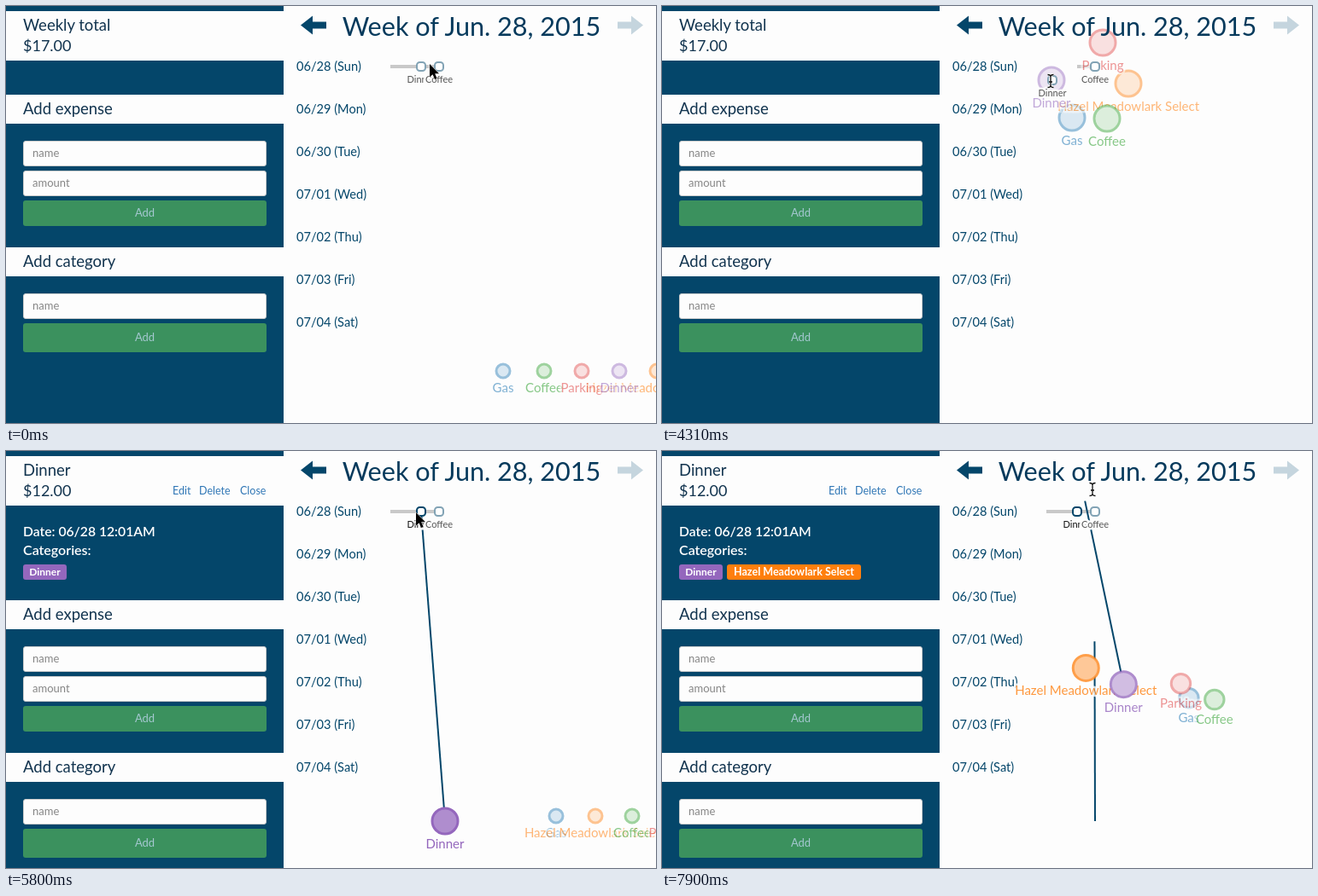
Animation of 761 by 489 pixels, one loop 8000 ms. Source, as an HTML page:

```html
<!DOCTYPE html>
<html lang="en">
<head>
<meta charset="utf-8">
<title>Weekly expenses</title>
<style>
  html, body { margin: 0; width: 100%; height: 100%; overflow: hidden; background: #fdfdfd; }
  svg { display: block; font-family: Lato, "Open Sans", sans-serif; }
  .halo { paint-order: stroke; stroke: #fdfdfd; stroke-width: 5px; stroke-linejoin: round; }
</style>
</head>
<body>
<svg id="stage" width="761" height="489" viewBox="0 0 761 489"></svg>
<script>
const LOOP = 8000, NAVY = '#04466a', PAPER = '#fdfdfd', INK = '#12344f';
const CARD = 'Hazel Meadowlark Select';
const DROPS = [4396, 7697], MOVE = 395;
const HOME = [486, 71], GRAB = [484, 72];

// The picture only changes at these moments.
const STEPS = [0, 150, 300, 440, 590, 890, 1040, 1190, 1330, 1630, 2670,
  3860, 4010, 4160, 4310, 4450, 4600, 4750, 4900, 5050, 5200, 5350, 5500,
  5800, 5950, 6250, 7000, 7150, 7300, 7450, 7600, 7750, 7900];

// time, x, y of the pointer
const POINTER = [[0, 496, 68], [590, 482, 73], [740, 482, 73], [1040, 498, 71],
  [1330, 486, 72], [1630, 484, 72], [3710, 484, 72], [4310, 455, 88], [4900, 455, 88],
  [5200, 470, 95], [5500, 484, 73], [5800, 480, 72], [5950, 483, 72], [6850, 483, 72],
  [7600, 504, 45], [LOOP, 504, 45]];

// docks: x in each of the three rows; rings: place around the picked expense
const CATEGORIES = [
  { name: 'Gas', color: '#1f77b4', docks: [582, 644, 689], rings: [[480, 131], [532, 127]] },
  { name: CARD, color: '#ff7f0e', docks: [762, 690, 488], rings: [[546, 91], [506, 43]], since: 2 },
  { name: 'Coffee', color: '#2ca02c', docks: [630, 733, 786], rings: [[521, 132], [483, 131]] },
  { name: 'Parking', color: '#e14444', docks: [674, 777, 737], rings: [[516, 43], [455, 90]] },
  { name: 'Dinner', color: '#9467bd', docks: [718, 514, 533], rings: [[456, 87], [549, 85]], since: 1 },
];

const mix = (a, b, p) => a.map((v, i) => v + (b[i] - v) * p);
const easeInOut = u => u < .5 ? 4 * u ** 3 : 1 - 4 * (1 - u) ** 3;
const progress = (t, start) => easeInOut(Math.min(1, Math.max(0, (t - start) / MOVE)));

function pointerAt(t) {
  const i = POINTER.findIndex(k => k[0] > t);
  const [a, b] = [POINTER[i - 1], POINTER[i]];
  return mix(a, b, (t - a[0]) / (b[0] - a[0])).slice(1);
}

const text = (x, y, size, fill, s, more = '') =>
  `<text x="${x}" y="${y}" font-size="${size}" fill="${fill}" ${more}>${s}</text>`;
const rect = (x, y, w, h, fill, more = '') =>
  `<rect x="${x}" y="${y}" width="${w}" height="${h}" fill="${fill}" ${more}/>`;
const line = ([x1, y1], [x2, y2], color, width = 2) =>
  `<line x1="${x1}" y1="${y1}" x2="${x2}" y2="${y2}" stroke="${color}" stroke-width="${width}"/>`;
const MID = 'text-anchor="middle"', BOLD = 'font-weight="600"';

const field = (y, hint) => rect(20.5, y + .5, 284, 29, PAPER, 'rx="2.5" stroke="#ccc"')
  + text(31, y + 19, 13, '#858585', hint);
const button = (y, h) => rect(20, y, 285, h, '#3b915e', 'rx="3"')
  + text(162.5, y + h / 2 + 4, 13, '#a6c9d2', 'Add', MID);
const band = (y, s) => rect(0, y, 325, 34, PAPER) + text(20, y + 23, 18.5, INK, s);
const tag = (x, w, color, s, size) => rect(x, 133, w, 18, color, 'rx="3"')
  + text(x + w / 2, 146, size, '#fff', s, MID + ' font-weight="700"');

function panel(t) {
  const open = t >= DROPS[0], dy = open ? 71 : 0;
  let s = rect(0, 0, 325, 489, NAVY) + rect(0, 6, 325, 58, PAPER)
    + text(20, 29, 18.5, INK, open ? 'Dinner' : 'Weekly total')
    + text(20, 53, 18, INK, open ? '$12.00' : '$17.00');
  if (open) {
    s += text(195, 51, 12.5, '#2f76b5', 'Edit') + text(226, 51, 12.5, '#2f76b5', 'Delete')
      + text(274, 51, 12.5, '#2f76b5', 'Close')
      + text(20, 100, 15.7, '#fff', 'Date: 06/28 12:01AM', BOLD)
      + text(20, 122, 16, '#fff', 'Categories:', BOLD)
      + tag(20, 51, '#9467bd', 'Dinner', 12);
    if (t >= DROPS[1]) s += tag(76, 157, '#ff7f0e', CARD, 12.5);
  }
  return s + `<g transform="translate(0 ${dy})">` + band(104, 'Add expense')
    + field(158, 'name') + field(193, 'amount') + button(228, 30)
    + band(283, 'Add category') + field(337, 'name') + button(372, 34) + '</g>';
}

// x, y, radius, opacity, fill opacity
function categoryAt(c, t) {
  const dock = row => c.since <= row
    ? [c.docks[row], 434, 15, 1, .75] : [c.docks[row], 428, 8, .45, .35];
  if (t < 2670) return dock(0);
  const n = t < 6250 ? 0 : 1;
  return mix([...c.rings[n], 15, .45, .35], dock(n + 1), progress(t, DROPS[n]));
}

function category(c, t) {
  const [x, y, r, alpha, fill] = categoryAt(c, t);
  return `<circle cx="${x}" cy="${y}" r="${r}" fill="${PAPER}"/>
    <circle cx="${x}" cy="${y}" r="${r}" fill="${c.color}" fill-opacity="${fill}"
      stroke="${c.color}" stroke-width="3" opacity="${alpha}"/>`
    + text(x, y + r + 17, 15, c.color, c.name, `${MID} class="halo" opacity="${.2 + .8 * alpha}"`);
}

function expense([x, y], name, active) {
  return rect(x - 5, y - 5, 10, 10, '#fff', `rx="3.5" stroke="${active ? NAVY : '#82a3b5'}" stroke-width="2"`)
    + text(x, y + 19, 11, active ? '#111' : '#555', name, MID + ' class="halo"');
}

function chart(t) {
  const n = t < 6250 ? 0 : 1, p = progress(t, DROPS[n]);
  const picked = t >= 2670 && t < 4900 || t >= 6250;
  const dragged = n ? t >= 7000 : picked;
  const hand = pointerAt(Math.min(t, n ? 7600 : 4310));
  const held = dragged ? HOME.map((v, i) => v + hand[i] - GRAB[i]) : HOME;
  const node = p > .5 ? HOME : held;
  const dinner = categoryAt(CATEGORIES[4], t);
  let s = '';

  if (!picked || p > .5) s += line([450, 71], [507, 71], '#c9c9c9', 4);
  else if (!n) s += line([486, 71], [507, 71], '#c9c9c9', 4);

  // A new link grows up from the row towards the dropped expense.
  if (picked && p > 0) {
    const base = [n ? 507 : 514, 434];
    s += line(base, mix(base, held, p), NAVY);
  }
  if (t >= 4900) {
    const from = mix(held, HOME, p);
    if (n && !p) s += line(from, dinner, '#c5d5de') + line(mix(from, dinner, .62), dinner, NAVY);
    else s += line(from, dinner, NAVY);
  }
  return s + CATEGORIES.map(c => category(c, t)).join('')
    + expense(node, 'Dinner', t >= 4600) + expense([507, 71], 'Coffee');
}

function pointer(t) {
  const [x, y] = pointerAt(t);
  const beam = t >= 4010 && t < 5350 || t >= 7150;
  const d = beam
    ? 'M-3.5-7.5Q0-7.5 0-5Q0-7.5 3.5-7.5M0-5V5M-3.5 7.5Q0 7.5 0 5Q0 7.5 3.5 7.5M-2 1H2'
    : 'M0 0V15.5L3.6 12.2 6 18 8.6 16.9 6.2 11.2H11Z';
  const at = `<path transform="translate(${x} ${y})" d="${d}"`;
  return beam
    ? `${at} fill="none" stroke="#fff" stroke-width="3"/>${at} fill="none" stroke="#111" stroke-width="1.3"/>`
    : `${at} stroke="#fff" stroke-width="1" paint-order="stroke"/>`;
}

const DAYS = ['06/28 (Sun)', '06/29 (Mon)', '06/30 (Tue)', '07/01 (Wed)',
  '07/02 (Thu)', '07/03 (Fri)', '07/04 (Sat)'];
const days = DAYS.map((d, i) => text(340, 76 + 50 * i, 14.6, NAVY, d)).join('');
const ARROW = 'd="M0 11L14 0V7H30V15H14V22Z"';
const header = text(545, 35, 30.6, '#063a5c', 'Week of Jun. 28, 2015', MID)
  + `<path ${ARROW} transform="translate(345 11.5)" fill="${NAVY}"/>
     <path ${ARROW} transform="translate(746 11.5) scale(-1 1)" fill="#c5d5de"/>`;

const stage = document.getElementById('stage');
const begin = performance.now();
let shown = -1;

function tick() {
  const now = (performance.now() - begin) % LOOP;
  const t = STEPS.filter(s => s <= now).pop();
  if (t !== shown) {
    shown = t;
    stage.innerHTML = days + chart(t) + header + panel(t) + pointer(t);
  }
  requestAnimationFrame(tick);
}
tick();
</script>
</body>
</html>
```
